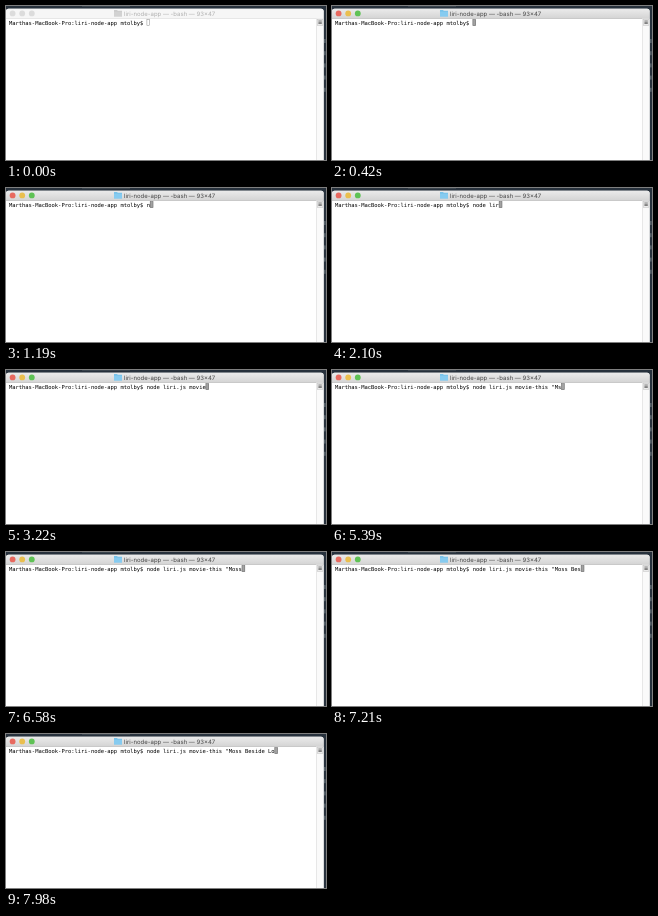
Animation of 320 by 154 pixels, one loop 8000 ms. Source, as an HTML page with a canvas:

```html
<!DOCTYPE html>
<html lang="en">
<head>
<meta charset="utf-8">
<title>Terminal</title>
<style>
  html, body { margin: 0; width: 100%; height: 100%; overflow: hidden; background: #27313c; }
  canvas { display: block; width: 320px; height: 154px; }
</style>
</head>
<body>
<canvas id="stage"></canvas>
<script>
const W = 320, H = 154, LOOP = 8000, FOCUS_AT = 420, TICK = 70;
const PROMPT = 'Marthas-MacBook-Pro:liri-node-app mtolby$ ';
const TITLE = 'liri-node-app — -bash — 93×47';
const WIN = { top: 2.8, right: 317.6, bar: 12.7 };
const CELL = 3.28, LEFT = 2.9, ROW = 13.4, ROW_H = 6.5;

// Bursts of keys: first key time, last key time, keys ('<' is backspace)
const BURSTS = [
  [1190, 1260, 'no'],
  [1400, 2100, 'de lir'],
  [2380, 2380, 'i.js '],
  [2870, 3220, 'movie'],
  [3430, 3780, '-thi'],
  [3920, 3920, 's'],
  [4480, 4620, ' "'],
  [4970, 4970, 'M'],
  [5390, 5530, 'ss'],
  [5950, 6580, '<<oss'],
  [6650, 6860, ' B'],
  [7070, 7560, 'eside '],
  [7910, 7980, 'Lo']
];

const KEYS = BURSTS.flatMap(([from, to, keys]) =>
  [...keys].map((key, i) => {
    const at = from + (to - from) * i / Math.max(1, keys.length - 1);
    return { key, at: Math.round(at / TICK) * TICK };
  }));

const canvas = document.getElementById('stage');
const ctx = canvas.getContext('2d');
const dpr = window.devicePixelRatio || 1;
canvas.width = W * dpr;
canvas.height = H * dpr;

function typedAt(t) {
  let text = '';
  for (const { key, at } of KEYS) {
    if (at > t) break;
    text = key === '<' ? text.slice(0, -1) : text + key;
  }
  return text;
}

function rect(x, y, w, h, color) {
  ctx.fillStyle = color;
  ctx.fillRect(x, y, w, h);
}

function outline(x, y, w, h, color) {
  ctx.strokeStyle = color;
  ctx.lineWidth = 0.5;
  ctx.strokeRect(x + 0.25, y + 0.25, w - 0.5, h - 0.5);
}

// Set type large and scale it down, so small sizes keep exact metrics
function label(text, x, y, size, family, color) {
  ctx.save();
  ctx.translate(x, y);
  ctx.scale(0.1, 0.1);
  ctx.font = `${size * 10}px ${family}`;
  ctx.fillStyle = color;
  ctx.fillText(text, 0, 0);
  ctx.restore();
}

function drawDesktop() {
  rect(0, 0, W, H, '#27313c');
  rect(76, 0, 48, 1, '#3a444d');
  for (let i = 0; i < 5; i++) rect(318, 33 + i * 12.2, 1.6, 4, '#59646c');
}

function drawWindow() {
  ctx.fillStyle = '#fff';
  ctx.beginPath();
  ctx.roundRect(0, WIN.top, WIN.right, H, 2.5);
  ctx.fill();
}

function drawTitleBar(active) {
  let fill = '#f6f6f6';
  if (active) {
    fill = ctx.createLinearGradient(0, WIN.top, 0, WIN.bar);
    fill.addColorStop(0, '#ebebeb');
    fill.addColorStop(1, '#d3d3d3');
  }
  ctx.fillStyle = fill;
  ctx.beginPath();
  ctx.roundRect(0, WIN.top, WIN.right, WIN.bar - WIN.top, [2.5, 2.5, 0, 0]);
  ctx.fill();
  rect(0, WIN.bar - 0.5, WIN.right, 0.5, active ? '#b2b2b2' : '#d4d4d4');

  const lights = active ? ['#e8695f', '#eabf4f', '#5fc255'] : Array(3).fill('#dcdcdc');
  lights.forEach((color, i) => {
    ctx.fillStyle = color;
    ctx.beginPath();
    ctx.arc(6.6 + i * 9.6, 7.4, 2.9, 0, Math.PI * 2);
    ctx.fill();
  });

  rect(108, 4, 3.4, 1.4, active ? '#74bfe6' : '#c9c9c9');
  rect(108, 4.7, 8, 6, active ? '#86cbf0' : '#d2d2d2');
  rect(108, 5.6, 8, 0.4, active ? '#6cb8e0' : '#c5c5c5');

  label(TITLE, 118, 9.7, 6, 'Inter, sans-serif', active ? '#454545' : '#b0b0b0');
}

function drawScrollbar() {
  const x = 310;
  rect(x, WIN.bar, WIN.right - x, H, '#fafafa');
  rect(x, WIN.bar, 0.7, H, '#dedede');
  rect(x + 1, 13, 6.2, 6.6, '#ececec');
  outline(x + 1, 13, 6.2, 6.6, '#c4c4c4');
  for (let i = 0; i < 3; i++) rect(x + 2.4, 14.6 + i * 1.3, 3.4, 0.8, '#666');
}

function drawLine(text, active) {
  const x = LEFT + text.length * CELL;
  if (active) rect(x, ROW, CELL, ROW_H, '#a2a2a2');
  outline(x, ROW, CELL, ROW_H, active ? '#6e6e6e' : '#8a8a8a');
  [...text].forEach((ch, i) =>
    label(ch, LEFT + i * CELL, 18.7, 5.5, '"DejaVu Sans Mono", monospace', '#000'));
}

function draw(t) {
  const active = t >= FOCUS_AT;
  ctx.setTransform(dpr, 0, 0, dpr, 0, 0);
  ctx.textRendering = 'geometricPrecision';
  drawDesktop();
  drawWindow();
  drawTitleBar(active);
  drawScrollbar();
  drawLine(PROMPT + typedAt(t), active);
}

const start = performance.now();
function tick() {
  draw((performance.now() - start) % LOOP);
  requestAnimationFrame(tick);
}
tick();
</script>
</body>
</html>
```
